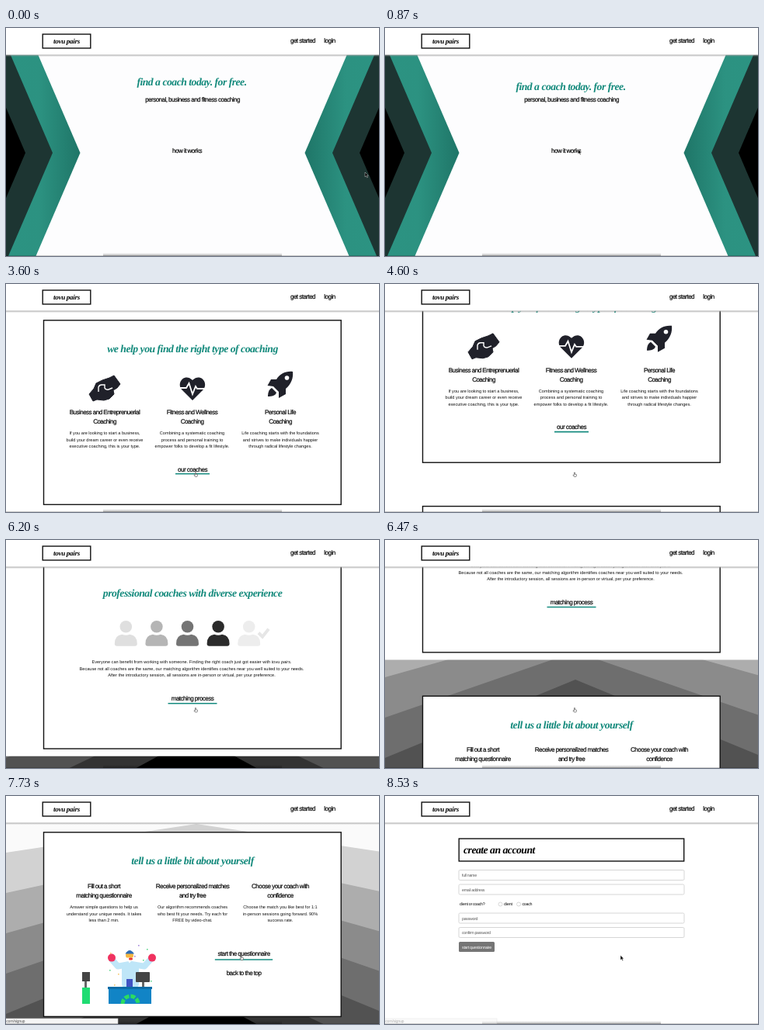
An HTML page that plays this animation: 480 by 294 pixels, repeating every 8590 ms.

```html
<!DOCTYPE html>
<html lang="en">
<head>
<meta charset="utf-8">
<title>Coaching site tour</title>
<style>
  html, body { margin: 0; width: 100%; height: 100%; overflow: hidden; background: #fff; }
  svg { display: block; width: 100vw; height: 100vh; text-rendering: geometricPrecision; }
  text { text-anchor: middle; fill: #111; white-space: pre; }
  .script { font: italic bold 13.7px "Liberation Serif", serif; letter-spacing: -.5px; fill: #12897b; }
  .logo { font-size: 9px; letter-spacing: -.3px; }
  .head { font: 8.1px "Liberation Sans", sans-serif; letter-spacing: -.56px; stroke: #111; stroke-width: .22px; }
  .body { font: 5.6px "Liberation Sans", sans-serif; }
  .form { font: 5.3px "Liberation Sans", sans-serif; letter-spacing: -.3px; fill: #555; }
  .left { text-anchor: start; }
  .ink { fill: #000; }
  .light { fill: #fff; }
  .card { fill: #fff; stroke: #111; stroke-width: 1.4; }
  .field { fill: #fff; stroke: #ccc; stroke-width: .8; }
  .line { stroke: #168c80; stroke-width: 1.6; }
  .icon { fill: #20212a; }
</style>
</head>
<body>
<svg id="stage" viewBox="0 0 480 294"></svg>
<script>
const LOOP = 8590, SECTION = 294, BRAND = 'tovu pairs';

// Markup helpers
const text = (cls, x, y, lines, gap = 0) => [].concat(lines)
  .map((s, i) => `<text class="${cls}" x="${x}" y="${y + i * gap}">${s}</text>`).join('');
const rect = (x, y, w, h, attrs) => `<rect x="${x}" y="${y}" width="${w}" height="${h}" ${attrs}/>`;
const poly = (points, attrs) => `<polygon points="${points}" ${attrs}/>`;
const circle = (x, y, r, attrs) => `<circle cx="${x}" cy="${y}" r="${r}" ${attrs}/>`;
const path = (d, attrs) => `<path d="${d}" ${attrs}/>`;
const link = (id, x, y, label) => text('head', x, y, label) + path('', `id="${id}" class="line"`);
const section = (n, content) => `<g transform="translate(0 ${n * SECTION})">${content}</g>`;
const card = title => rect(48.5, 46.8, 382.7, 237.6, 'class="card"') + text('script', 240, 88, title);
const column = (x, y, heading, lines, gap) =>
  text('head', x, y, heading, 12.3) + text('body', x, y + gap, lines, 8.7);

// Home: nested chevrons on both sides
const chevron = (tip, fill) => poly(`-80,0 ${tip - 69},0 ${tip},161 ${tip - 57},294 -80,294`, `fill="${fill}"`);
const chevrons = chevron(95.5, 'url(#teal)') + chevron(60, '#1d3532') + chevron(25, '#000');
const home = rect(0, 0, 480, 294, 'fill="#fdfdfe"') + chevrons +
  `<g transform="translate(480) scale(-1 1)">${chevrons}</g>` +
  `<g id="headline">${text('script', 239, 74, 'find a coach today. for free.')}</g>` +
  text('head', 240, 95, 'personal, business and fitness coaching') +
  link('how', 233, 161, 'how it works');

// Types of coaching
const handshake = path('M124 124 L133 121 L139 118 L147 129 L143 134 L138 137 L139 142 L133 148 L126 150 L117 149 L112 151 L107 142 L113 135 L116 128 Z',
    'class="icon" stroke="#20212a" stroke-linejoin="round"') +
  path('M119 139 V133 Q120 130 123 130 H127 V134 Q128 137 132 136 L137 134', 'fill="none" stroke="#fff" stroke-width="1.4"');
const heart = path('M240 150 L226 136 C219 127 230 114 240 124 C250 114 261 127 254 136 Z', 'class="icon"') +
  path('M222 134 H232 L235.5 128 L240 142 L244 132 L246 135 H258', 'fill="none" stroke="#fff" stroke-width="1.8"');
const rocket = '<g id="rocket">' +
  path('M369 113 C360 112 352 116 348 123 L341 123 L336.500 131 L344 132 L351 139 V147 L360 142 V135 C367 129 370 121 369 113 Z', 'class="icon"') +
  path('M342 134 C338 136 337 141 337 145 C342 145 347 144 348 140 Z', 'class="icon"') +
  circle(361.5, 121, 2.8, 'fill="#fff"') + '</g>';
const types = card('we help you find the right type of coaching') +
  handshake + heart + rocket +
  column(127, 168, ['Business and Entreprenuerial', 'Coaching'],
    ['If you are looking to start a business,', 'build your dream career or even receive', 'executive coaching, this is your type.'], 26) +
  column(239.5, 168, ['Fitness and Wellness', 'Coaching'],
    ['Combining a systematic coaching', 'process and personal training to', 'empower folks to develop a fit lifestyle.'], 26) +
  column(353, 168, ['Personal Life', 'Coaching'],
    ['Life coaching starts with the foundations', 'and strives to make individuals happier', 'through radical lifestyle changes.'], 26) +
  link('our', 240, 241.5, 'our coaches');

// Coaches
const person = (fill, i) => `<g fill="${fill}" transform="translate(${154.3 + i * 39.6} 0)">` + circle(0, 127, 7.8, '') +
  path('M-14.5 149 Q-14.5 138 -5 137 Q0 139 5 137 Q14.5 138 14.5 149 Q14.5 152 11.5 152 H-11.5 Q-14.5 152 -14.5 149 Z', '') + '</g>';
const coaches = card('professional coaches with diverse experience') +
  ['#dfdfdf', '#b5b5b5', '#747474', '#2b2b2b', '#ededed'].map(person).join('') +
  path('M325 135 L330 140 L338 130', 'fill="none" stroke="#e6e6e6" stroke-width="4"') +
  text('body', 239, 174.5, [
    `Everyone can benefit from working with someone. Finding the right coach just got easier with <tspan font-style="italic">${BRAND}.</tspan>`,
    'Because not all coaches are the same, our matching algorithm identifies coaches near you well suited to your needs.',
    'After the introductory session, all sessions are in-person or virtual, per your preference.'], 8.5) +
  link('match', 240, 222, 'matching process');

// Questionnaire, over a fixed backdrop
const backdrop = rect(0, 0, 480, 294, 'fill="#fafafa"') +
  ['#d2d2d2', '#adadad', '#8b8b8b', '#6e6e6e', '#525252', '#333', '#000'].map((fill, i) =>
    poly(`0,${73 + i * 52} 245,${36 + i * 36} 490,${73 + i * 52} 490,400 0,400`, `fill="${fill}"`)).join('');
const confetti = Array.from({ length: 12 }, (_, i) =>
  rect(133 + i * 37 % 58, 0, 1.6, 1.2, `class="bit" fill="${['#2fc96b', '#8a63d2', '#f5b63a'][i % 3]}"`)).join('');
const office = '<g clip-path="url(#picture)">' + confetti +
  rect(98, 227, 10, 12, 'fill="#444"') + rect(101, 239, 3, 8, 'fill="#666"') + rect(98, 247, 10, 21, 'fill="#1fdc72"') +
  '<g id="dancer">' +
  path('M136 211 L144 220 L160 217 L178 220 L187 210', 'fill="none" stroke="#bfe6f8" stroke-width="8" stroke-linejoin="round"') +
  rect(149, 215, 22, 33, 'rx="5" fill="#bfe6f8"') +
  circle(136, 209, 5, 'fill="#f0325f"') + circle(188, 209, 5, 'fill="#f0325f"') +
  circle(159, 206, 5, 'fill="#f4b63f"') + path('M153.500 204 Q159 195 165 204 Z', 'fill="#2f6db5"') +
  path('M154 209 H164 L159 216 Z', 'fill="#fff"') + rect(158, 209, 5, 3, 'rx="1.5" fill="#e8382f"') + '</g>' +
  rect(155, 236, 8, 10, 'fill="#4054c4"') +
  rect(167, 227, 18, 13, 'rx="1" fill="#444"') + rect(175, 240, 3, 8, 'fill="#666"') +
  rect(132, 248, 55, 20, 'fill="#1184c6"') + rect(131, 246, 57, 3, 'fill="#0c6ca6"') +
  path('M150 268 A10 10 0 0 1 170 268', 'fill="none" stroke="#2bdc60" stroke-width="5" stroke-dasharray="6 2"') + '</g>';
const questions = card('tell us a little bit about yourself') +
  column(126, 118.5, ['Fill out a short', 'matching questionnaire'],
    ['Answer simple questions to help us', 'understand your unique needs. It takes', 'less than 2 min.'], 26.5) +
  column(240, 118.5, ['Receive personalized matches', 'and try free'],
    ['Our algorithm recommends coaches', 'who best fit your needs. Try each for', 'FREE by video-chat.'], 26.5) +
  column(353, 118.5, ['Choose your coach with', 'confidence'],
    ['Choose the match you like best for 1:1', 'in-person sessions going forward. 90%', 'success rate.'], 26.5) +
  office + link('start', 306, 206, 'start the questionnaire') + text('head', 306, 231, 'back to the top');

// Sign-up page
const field = (y, label) => rect(95, y, 290, 13, 'rx="1.5" class="field"') + text('form left', 99, y + 8.5, label);
const radio = (x, label) => circle(x, 139.5, 2.5, 'class="field"') + text('form left ink', x + 4.5, 141, label);
const account = rect(0, 0, 480, 294, 'fill="#fff"') + rect(95.2, 55, 289.5, 29, 'class="card"') +
  text('script left ink', 101, 74, 'create an account') +
  field(95.5, 'full name') + field(114, 'email address') + field(151, 'password') + field(169.5, 'confirm password') +
  text('form left ink', 96, 141, 'client or coach?') + radio(148.5, 'client') + radio(172, 'coach') +
  rect(95, 188, 46, 13, 'rx="1.5" fill="#757575"') + text('form light', 118, 196.5, 'start questionnaire');

const header = rect(0, 34, 480, 3, 'fill="url(#shade)"') + rect(0, 0, 480, 34.5, 'fill="#fff"') +
  rect(47.2, 8, 61.6, 18, 'class="card"') +
  text('script logo ink', 78, 19.5, BRAND) + text('head', 382, 18.5, 'get started') + text('head', 416.5, 18.5, 'login');

const stage = document.getElementById('stage');
stage.innerHTML = `<defs>
  <linearGradient id="teal" gradientUnits="userSpaceOnUse" x1="0" y1="0" x2="95" y2="0">
    <stop offset="0" stop-color="#2c9382"/><stop offset=".45" stop-color="#2c9281"/><stop offset="1" stop-color="#1f7668"/></linearGradient>
  <linearGradient id="shade" x2="0" y2="1"><stop stop-color="#999"/><stop offset="1" stop-color="#999" stop-opacity="0"/></linearGradient>
  <linearGradient id="dock" x2="0" y2="1"><stop stop-color="#000" stop-opacity="0"/><stop offset="1" stop-color="#000" stop-opacity=".3"/></linearGradient>
  <clipPath id="picture">${rect(97, 183, 97, 85, '')}</clipPath></defs>` +
  backdrop + `<g id="page">${rect(0, 0, 480, SECTION * 3, 'fill="#fff"')}${[home, types, coaches, questions].map((s, i) => section(i, s)).join('')}</g>` +
  `<g id="account">${account}</g>` + header +
  rect(125, 290, 230, 4, 'fill="url(#dock)"') + rect(0, 293, 480, 1, 'fill="#000" opacity=".2"') +
  `<g id="status">${rect(-2, 287, 146, 6.5, 'fill="#f6f6f6" stroke="#ccc" stroke-width=".6"')}${text('form left', -1, 291.8, '.com/signup')}</g>` +
  `<g id="cursor">${path('M0 0 V6 L1.5 4.7 L2.6 7 L3.5 6.5 L2.5 4.3 H4.3 Z', 'id="arrow" fill="#000" stroke="#fff" stroke-width=".4"')}` +
  path('M-.6 .6 Q0 0 .5 .6 V2.8 L2.4 3.2 Q2.8 5 1.8 6 H-.6 L-2.1 4 Q-1.6 3.4 -.6 4.2 Z', 'id="hand" fill="#fff" stroke="#444" stroke-width=".6"') + '</g>';

const el = id => document.getElementById(id);
const swing = (t, from, to) => .5 - Math.cos(Math.PI * Math.min(1, Math.max(0, (t - from) / (to - from)))) / 2;
const show = (id, visible) => el(id).setAttribute('visibility', visible ? 'visible' : 'hidden');
const move = (id, x, y) => el(id).setAttribute('transform', `translate(${x} ${y})`);

const scrolls = [1767, 4375, 6084];
const underlines = [ // id, centre, y, half width, hover time
  ['how', 233, 169, 25, 900], ['our', 240, 244.8, 22, 3300],
  ['match', 240, 226, 31.5, 5750], ['start', 306, 211, 38, 7550]];
const travels = [ // from, to, dx, dy
  [70, 1000, -224, -31], [2700, 3400, 6, 87.5], [5350, 5850, 0, -26.5], [7100, 7650, 59, -10.5]];
const NEW_PAGE = 8060;

function draw(t) {
  move('page', 0, -SECTION * scrolls.reduce((sum, s) => sum + swing(t, s, s + 800), 0));
  move('headline', 0, 6 * swing(t, 70, 870));
  move('rocket', 0, -5 * swing(t, 3600, 4400));
  move('dancer', 0, 1.5 * Math.sin((t - 7070) / 110));
  document.querySelectorAll('.bit').forEach((bit, i) => bit.setAttribute('y', 190 + (i * 23 + t / 25) % 55));

  for (const [id, x, y, half, at] of underlines) {
    const w = half * swing(t, at, at + 200);
    el(id).setAttribute('d', `M${x - w} ${y}H${x + w}`);
  }

  let x = 462, y = 186, moving = false;
  for (const [from, to, dx, dy] of travels) {
    const k = swing(t, from, to);
    x += dx * k;
    y += dy * k;
    moving ||= k > .1 && k < .9;
  }
  move('cursor', x, y);
  const hand = t > 900 && t < NEW_PAGE && !moving;
  show('hand', hand);
  show('arrow', !hand);

  show('account', t >= NEW_PAGE);
  show('status', t >= 6880);
  el('status').setAttribute('opacity', 1 - .6 * swing(t, 8420, 8560));
}

function tick() {
  draw(performance.now() % LOOP);
  requestAnimationFrame(tick);
}
tick();
</script>
</body>
</html>
```
